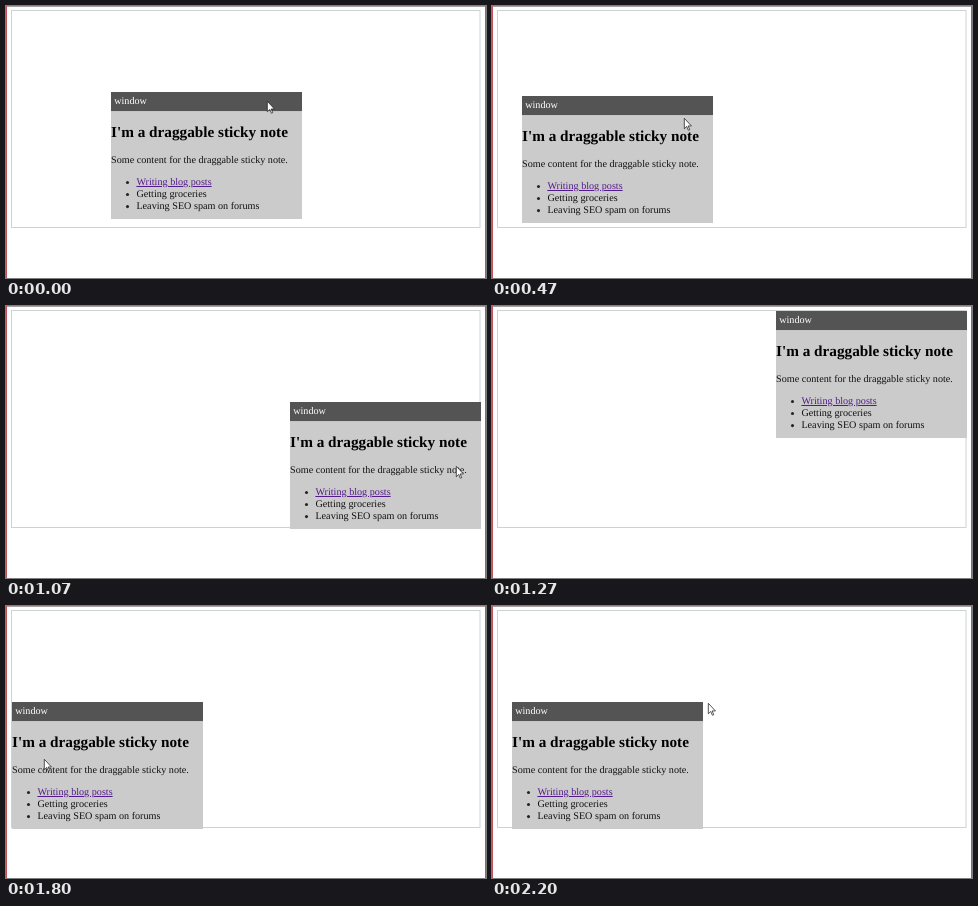
Animation of 480x272 px, one loop 2.27 s. Source, as an HTML page:

```html
<!DOCTYPE html>
<html lang="en">
<head>
<meta charset="utf-8">
<title>Draggable sticky note</title>
<style>
  html, body { margin: 0; width: 100%; height: 100%; overflow: hidden; background: #fff; }
  svg { display: block; width: 480px; height: 272px; }
  text { font: 16px "Liberation Serif", "Times New Roman", serif; fill: #111; text-rendering: geometricPrecision; }
  .title { fill: #fff; }
  .head { font-size: 24px; font-weight: bold; fill: #000; }
  .link { fill: #551a8b; text-decoration: underline; }
</style>
</head>
<body>
<svg viewBox="0 0 480 272">
  <path d="M0 .5H480" stroke="#a8a0a0"/>
  <path d="M.5 0V272M479.5 0V272" stroke="#c4505a"/>
  <rect x="5.5" y="4.5" width="468.5" height="217" fill="none" stroke="#cbd3d3"/>
  <g id="note">
    <rect width="300.8" height="200" fill="#cbcbcb"/>
    <rect width="300.8" height="30" fill="#545454"/>
    <text class="title" x="5" y="19.2">window</text>
    <text class="head" y="71">I'm a draggable sticky note</text>
    <text y="111.5">Some content for the draggable sticky note.</text>
    <g fill="#222">
      <circle cx="26" cy="142.5" r="2.4"/>
      <circle cx="26" cy="161.5" r="2.4"/>
      <circle cx="26" cy="180.5" r="2.4"/>
    </g>
    <text class="link" x="40" y="147">Writing blog posts</text>
    <text x="40" y="166">Getting groceries</text>
    <text x="40" y="185">Leaving SEO spam on forums</text>
  </g>
  <path id="cursor" d="M.5 .5v16.5l3.8-3.7 2.6 6 2.2-.9-2.6-5.9h5.2z" fill="#fff" stroke="#222" stroke-width="1.2"/>
</svg>
<script>
const LOOP = 2270, SCALE = 0.635, LAG = 0.8;
const GRIP = [156.5, 9.3];           // where the pointer holds the note
const MIN = [6, 5], MAX = [284, 96]; // limits of the note inside the box
const note = document.getElementById('note');
const cursor = document.getElementById('cursor');

// Key points of the pointer: step, x, y
const keys = [
  [0, 261, 95], [2, 366, 45], [3, 283, 6], [4, 184, 32], [6, 185, 96], [7, 192, 112], // circle
  [12, 520, 235], [15, 520, 235],                                                     // out at the right
  [16, 450, 160], [19, 475, -30], [20, 330, -30], [21, 60, 130],                      // over the top
  [22, -20, 150], [25, -20, 150],                                                     // out at the left
  [27, 38, 153], [29, 135, 45], [30, 140, 2], [32, 166.6, 122], [33, 216, 97]         // circle
];

// Smooth curve through four values, between b and c
function spline(a, b, c, d, u) {
  return b + u / 2 * (c - a + u * (2 * a - 5 * b + 4 * c - d + u * (3 * (b - c) + d - a)));
}

function pointer(step) {
  const last = keys.length - 1;
  const i = Math.min(last - 1, keys.findLastIndex(k => k[0] <= step));
  const [a, b, c, d] = [i - 1, i, i + 1, i + 2].map(j => keys[Math.max(0, Math.min(last, j))]);
  const u = (step - b[0]) / (c[0] - b[0]);
  return [1, 2].map(n => spline(a[n], b[n], c[n], d[n], u));
}

// Three steps every 200 ms
function stepAt(t) {
  const r = t % 200;
  return 3 * Math.floor(t / 200) + (r >= 70) + (r >= 130);
}

function place(el, [x, y]) {
  el.setAttribute('transform', `translate(${x} ${y}) scale(${SCALE})`);
}

function draw(t) {
  const step = stepAt(t);
  const tip = pointer(step), before = pointer(Math.max(0, step - 1));
  // The note trails the pointer and stays inside the box
  const pos = tip.map((v, i) => {
    const pull = LAG * before[i] + (1 - LAG) * v - GRIP[i];
    return Math.round(Math.min(MAX[i], Math.max(MIN[i], pull)));
  });
  place(note, pos);
  place(cursor, tip);
}

const start = performance.now();
function tick() {
  draw((performance.now() - start) % LOOP);
  requestAnimationFrame(tick);
}
tick();
</script>
</body>
</html>
```
